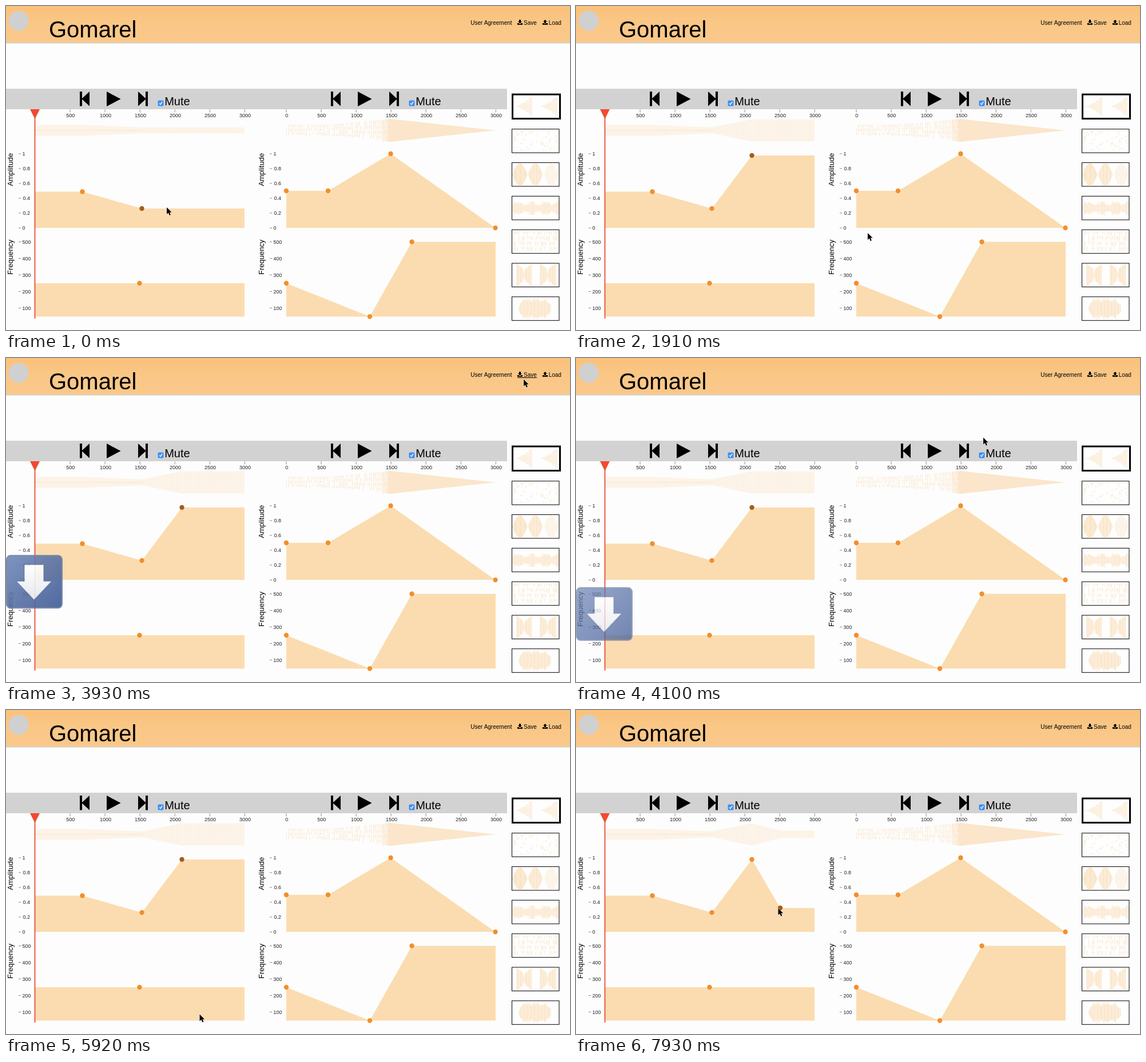
Recreate the animation shown at these times as an HTML page. Size 986 px wide and 568 px high, loop 7990 ms.

```html
<!DOCTYPE html>
<html lang="en">
<head>
<meta charset="utf-8">
<title>Gomarel</title>
<style>
html, body { margin: 0; width: 100%; height: 100%; overflow: hidden; background: #fdfdfd; }
svg { display: block; width: 986px; height: 568px; font-family: "Liberation Sans", Arial, sans-serif; }
</style>
</head>
<body>
<svg id="stage" viewBox="0 0 986 568" xmlns="http://www.w3.org/2000/svg"></svg>
<script>
const LOOP = 7990, SHIFT = 439, MID = 218;
const FILL = '#fbdcb0', WAVE = '#fbe4c6', DOT = '#f28e2b', DARK = '#a65d1a';
const stage = document.getElementById('stage');

let seed = 7;
const rnd = () => (seed = seed * 16807 % 2147483647) / 2147483647;
const text = (x, y, size, str, extra = '') =>
  `<text x="${x}" y="${y}" font-size="${size}" ${extra}>${str}</text>`;
const rect = (x, y, w, h, fill, extra = '') =>
  `<rect x="${x}" y="${y}" width="${w}" height="${h}" fill="${fill}" ${extra}/>`;
const dot = ([x, y], fill = DOT) => `<circle cx="${x}" cy="${y}" r="4.2" fill="${fill}"/>`;
const vline = (x, a, b) => `M${x.toFixed(1)} ${a.toFixed(1)}V${b.toFixed(1)}`;
const lines = (d, w = 1, color = WAVE) => `<path d="${d}" stroke="${color}" stroke-width="${w}" fill="none"/>`;

// Linear interpolation through rows of [key, ...values]
function along(rows, k) {
  if (k <= rows[0][0]) return rows[0].slice(1);
  for (let i = 1; i < rows.length; i++) {
    const a = rows[i - 1], b = rows[i];
    if (k < b[0]) {
      const u = (k - a[0]) / (b[0] - a[0]);
      return a.slice(1).map((v, j) => v + (b[j + 1] - v) * u);
    }
  }
  return rows[rows.length - 1].slice(1);
}

const area = (pts, x0, x1, base) => {
  const end = pts[pts.length - 1];
  return `M${x0} ${base}V${pts[0][1]}L${pts.join(' ')}L${x1} ${end[1]}V${base}Z`;
};
const half = (pts, x) => (389 - along(pts, x)[0]) / 130 * 20;

function header() {
  const tray = (x, up) => `<g transform="translate(${x} 24)"><path d="${up
    ? 'M4.5 0L8 3.6H6V6.6H3V3.6H1Z' : 'M3 0H6V3H8L4.5 6.6L1 3H3Z'}"/><path d="M0 6H2.2L3.6 7.4H5.4L6.8 6H9V9H0Z"/></g>`;
  return rect(0, 0, 986, 64, 'url(#bar)') + rect(0, 64, 986, 1.6, '#d3d0cc') +
    '<circle cx="22" cy="26" r="17.5" fill="#d0d0d0"/>' +
    text(75, 55, 40, 'Gomarel') +
    text(812.3, 32.7, 10, 'User Agreement') + tray(894, false) +
    text(905, 32.7, 10, 'Save') + tray(938, true) + text(948.7, 32.7, 10, 'Load') +
    '<path id="under" d="M894 34.5H928" stroke="#000" stroke-width="1"/>';
}

function controls() {
  return '<path d="M129 150H133V162L146 150V175.5L133 163.5V175.5H129Z' +
    'M176 150L200.5 163L176 176Z' +
    'M248 150H244V162L231 150V175.5L244 163.5V175.5H248Z"/>' +
    rect(265.5, 165.5, 10, 10, '#3b8ff6', 'rx="2"') +
    '<path d="M268 170.6L269.9 172.7L273.2 167.8" fill="none" stroke="#fff" stroke-width="1.4"/>' +
    text(277.2, 174, 20, 'Mute');
}

function axes(first) {
  let s = '';
  const small = 'text-anchor="middle" fill="#222"', side = 'text-anchor="end" fill="#222"';
  let ticks = '';
  for (let ms = first; ms <= 3000; ms += 500) {
    const x = 51 + ms * 0.1221;
    ticks += `M${x} 181.5V186.5`;
    s += text(x + 0.8, 195.3, 9, ms, small);
  }
  for (let i = 0; i <= 5; i++) {
    const y = 389 - i * 26;
    ticks += `M22 ${y}H26`;
    s += text(i % 5 ? 42 : 33.6, y + 3.2, 9, i % 5 ? '0.' + i * 2 : i / 5, i % 5 ? side : side);
  }
  for (let i = 1; i <= 5; i++) {
    const y = 558.5 - i * 29;
    ticks += `M22 ${y}H26`;
    s += text(43.5, y + 3.2, 9, i * 100, side);
  }
  const label = (y, str) => text(0, 0, 13, str, `transform="translate(12 ${y}) rotate(-90)"`);
  return s + lines(ticks, 1, '#8a8a8a') + label(315.7, 'Amplitude') + label(471, 'Frequency');
}

const rightAmp = [[490, 324], [563, 324], [672.5, 259], [855.5, 389]];
const rightFreq = [[490, 486], [636, 544.5], [709.5, 413.5]];

function rightPanel() {
  let d = '';
  for (let x = 490.5; x < 668; x += 3.1) {
    const h = half(rightAmp, x), n = x < 560 ? 3 : 4;
    for (let i = 0; i < n; i++) {
      if (rnd() < 0.2) continue;
      const y = MID - h + 2 * h * i / n, len = 2 * h / n * (0.55 + 0.45 * rnd());
      d += `M${x.toFixed(1)} ${y.toFixed(1)}l${(rnd() - 0.3).toFixed(1)} ${len.toFixed(1)}`;
    }
  }
  for (let x = 658; x < 690; x += 2) d += vline(x, MID - half(rightAmp, x), MID + half(rightAmp, x));
  const h = half(rightAmp, 668);
  return lines(d) + `<path d="M668 ${MID - h}L672.5 198L855.5 218L672.5 238L668 ${MID + h}Z" fill="#fbe6cb"/>` +
    `<path d="${area(rightAmp, 490, 856, 389)}${area(rightFreq, 490, 856, 544.5)}" fill="${FILL}"/>` +
    [...rightAmp, ...rightFreq].map(p => dot(p)).join('');
}

function thumbs() {
  let s = rect(885.5, 155, 83, 42.5, '#fefefe', 'stroke="#000" stroke-width="3"');
  for (let i = 1; i < 7; i++)
    s += rect(884.5, 157 + i * 58.8, 82.5, 41.5, '#fefefe', 'stroke="#000" stroke-width="1"');
  let d = '';
  const bar = (x, c, h) => d += vline(x, c - h, c + h);
  // rising wedges
  for (const x0 of [893, 937])
    for (let i = 0; i < 27; i += 2) bar(x0 + i, 176, 1 + 18 * Math.pow(i / 27, 1.3) * (0.7 + 0.3 * rnd()));
  // scattered ticks
  for (let i = 0; i < 70; i++) {
    const x = (i % 2 ? 887 : 928) + rnd() * 35, y = 219 + rnd() * 32;
    d += vline(x, y, y + 1 + rnd() * 3);
  }
  // lobes
  const lobe = (x0, x1, step) => {
    for (let x = x0; x <= x1; x += step)
      bar(x, 295.5, 1 + 19 * Math.pow(Math.sin(Math.PI * (x - x0) / (x1 - x0)), 0.9));
  };
  lobe(886, 911, 0.9); lobe(913, 938, 1.2); lobe(941, 965, 2.6);
  // uneven blocks
  for (let x = 886; x < 966; x += 1.5)
    bar(x, 354.5, (7 + 6 * Math.abs(Math.sin((x - 886) * 0.14))) * (0.55 + 0.5 * rnd()));
  // dashes
  for (let x = 887; x < 965; x += 3)
    for (let i = 0; i < 4; i++)
      if (rnd() > 0.25) { const y = 394 + i * 9.5; d += vline(x + rnd(), y, y + 4 + rnd() * 5); }
  // columns
  [[893, 904], [908, 919], [934, 945], [949, 961]].forEach(([a, b], i) => {
    for (let x = a; x < b; x += 1.3)
      bar(x, 471.5, 11 + 8.5 * (i % 2 ? (x - a) : (b - x)) / 11);
  });
  for (const x0 of [904, 945]) for (let x = x0; x < x0 + 5; x += 2) bar(x, 471.5, 5 + 4 * rnd());
  // burst
  for (let x = 897; x < 953; x += 1.2)
    bar(x, 530.5, Math.min(14, 5 + (x - 897), 5 + (953 - x)) * (0.8 + 0.5 * rnd()));
  return s + lines(d, 0.95, '#fbe3c5');
}

stage.innerHTML = `<defs>
  <linearGradient id="bar" x2="0" y2="1"><stop offset="0" stop-color="#f9c17a"/>
    <stop offset=".5" stop-color="#fac787"/><stop offset="1" stop-color="#fac88a"/></linearGradient>
  <linearGradient id="blue" x2="1" y2="1"><stop offset="0" stop-color="#7289b8"/>
    <stop offset="1" stop-color="#3f5a95"/></linearGradient>
  <linearGradient id="pale" x2="0" y2="1"><stop offset="0" stop-color="#fff"/>
    <stop offset="1" stop-color="#e4e7ec"/></linearGradient></defs>
  ${rect(0, 0, 986, 568, '#fdfdfd')}${header()}${rect(0, 145, 876, 36, '#d2d2d2')}
  ${controls()}<g transform="translate(${SHIFT})">${controls()}</g>
  ${axes(500)}<g transform="translate(${SHIFT})">${axes(0)}</g>
  ${rightPanel()}${thumbs()}
  <path id="wave" stroke="${WAVE}" stroke-width="1"/>
  <path id="amp" fill="${FILL}"/>
  ${rect(50, 486, 367, 58.5, FILL)}${dot([233.5, 486])}
  <g id="dots"></g>
  <path d="M50.5 190V548" stroke="#e8432d" stroke-width="1.7"/>
  <path d="M42 181H59L50.5 198Z" fill="#f04a32"/>
  <g id="load">
    ${rect(1, 1, 97, 92, 'url(#blue)', 'rx="7" stroke="#6c7fa6" stroke-width="2"')}
    <path d="M32 17H66V46H80L49 79L18 46H32Z" fill="url(#pale)" stroke="#3c5080" stroke-opacity=".45" stroke-width="1.5"/>
  </g>
  <path id="cursor" d="M0 0V12L2.8 9.4L4.8 14L6.9 13.1L5 8.7H8.7Z" stroke="#fff" stroke-width="1" paint-order="stroke"/>`;

const $ = id => document.getElementById(id);
const [wave, amp, dots, load, cursor, under] =
  ['wave', 'amp', 'dots', 'load', 'cursor', 'under'].map($);

const path = [
  [0, 281, 353], [59, 281, 353], [60, 298, 353], [210, 298, 353], [500, 311, 354], [1040, 311, 354],
  [1210, 309, 262], [1390, 306, 251], [1630, 306, 251], [1980, 560, 434], [2390, 888, 250],
  [2450, 886, 248], [2650, 875, 225], [2900, 881.5, 184.5], [3050, 892, 140], [3190, 887, 91],
  [3640, 905, 37.5], [3980, 905, 37.5], [4540, 12, 510], [5170, 42, 566], [5920, 338, 534],
  [6160, 465, 400], [6250, 462, 328], [6340, 454, 335], [6580, 454, 335], [6800, 315, 349],
  [7000, 332, 308], [7100, 350, 319.5], [7340, 355, 347], [7925, 355, 347], [7930, 353.5, 347.5]
];

function points(t) {
  const p = [[50, 325.5], [133.5, 325.5], [237.5, 355]];
  if (t >= 1330) p.push([307.5, 262]);
  else if (t >= 1270) p.push([308.5, 274]);
  else if (t >= 1150) p.push([311.5, 343]);
  else if (t >= 620) p.push([311.5, 354]);
  if (t >= 7460) p.push([357, 347]);
  return p;
}

let shown = '';
function drawLeft(pts) {
  const key = pts.join();
  if (key === shown) return;
  shown = key;
  let d = '';
  for (let x = 51.5; x < 417; x += 2.6) {
    const h = half(pts, x);
    d += vline(x, MID - h, MID + h);
  }
  wave.setAttribute('d', d + 'M51 218H240');
  amp.setAttribute('d', area(pts, 50, 417, 389));
  dots.innerHTML = pts.slice(1).map((p, i) => dot(p, i === pts.length - 2 ? DARK : DOT)).join('');
}

function draw(t) {
  drawLeft(points(t));
  const [x, y] = along(path, t);
  cursor.setAttribute('transform', `translate(${x.toFixed(2)} ${y.toFixed(2)})`);
  cursor.setAttribute('visibility', t >= 4625 && t < 5170 ? 'hidden' : 'visible');
  under.setAttribute('visibility', t >= 3500 && t < 4040 ? 'visible' : 'hidden');
  const [top, alpha] = along([[3810, 305, 0], [3930, 345, 0.9], [4050, 385, 0.9], [4320, 474, 0]], t);
  load.setAttribute('transform', `translate(0 ${top.toFixed(2)})`);
  load.setAttribute('opacity', alpha.toFixed(3));
}

const start = performance.now();
function tick() {
  draw((performance.now() - start) % LOOP);
  requestAnimationFrame(tick);
}
draw(0);
requestAnimationFrame(tick);
</script>
</body>
</html>
```
